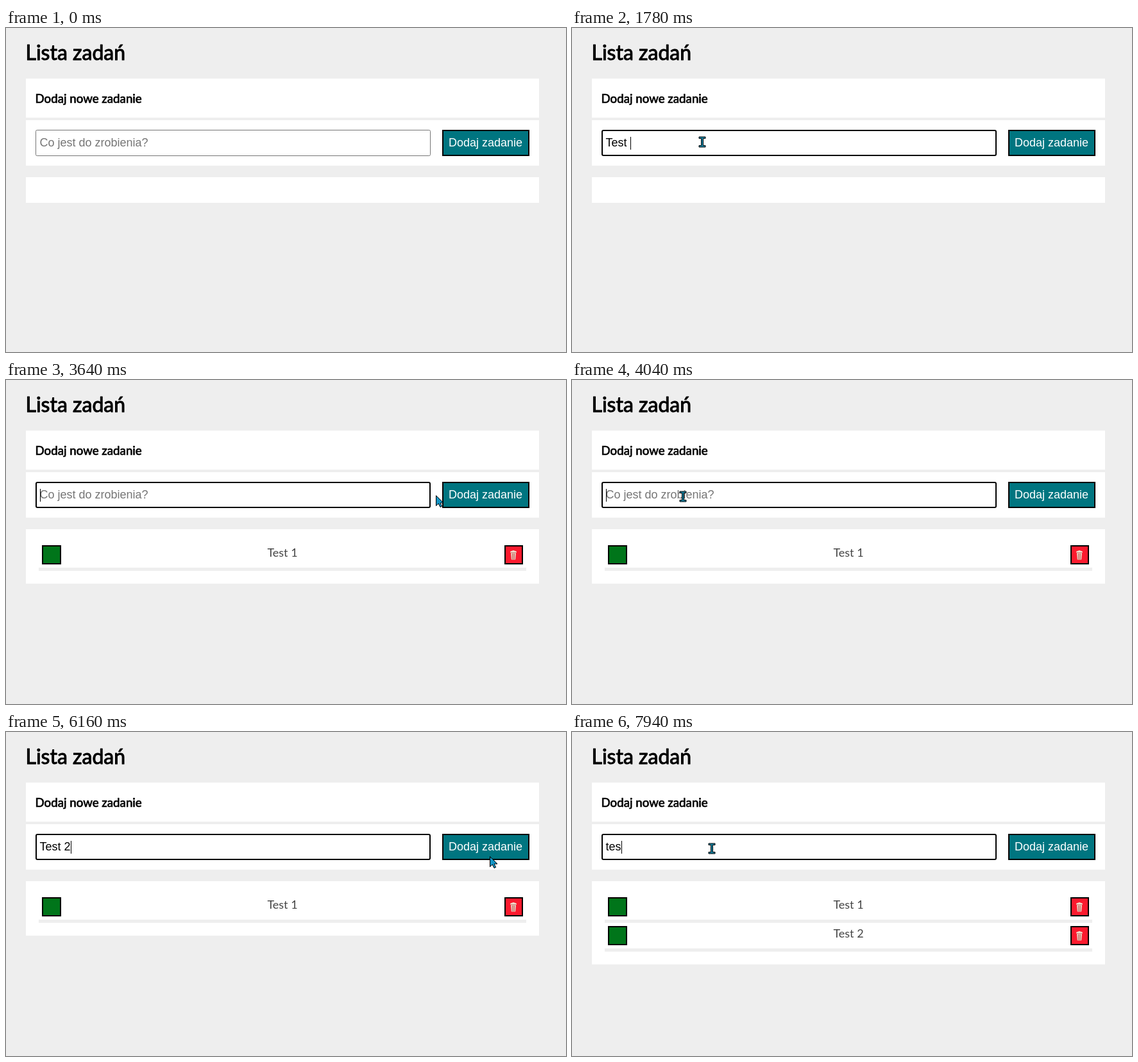
An HTML page for the animation above (8000 ms loop, 873x506 px).

```html
<!DOCTYPE html>
<html lang="pl">
<meta charset="utf-8">
<title>Lista zadań</title>
<style>
  html, body { margin: 0; width: 100%; height: 100%; overflow: hidden; background: #eee; }
  svg { display: block; }
  text { font: 18px "Liberation Sans", Arial, sans-serif; white-space: pre; }
  .lato { font-family: Lato, sans-serif; }
  .heading { stroke: #000; stroke-linejoin: round; }
  .item { fill: #444; text-anchor: middle; }
</style>
<svg width="873" height="506" viewBox="0 0 873 506">
  <defs>
    <g id="row">
      <rect x="51" y="293" width="760" height="5" fill="#eee"/>
      <rect x="57" y="259" width="28" height="28" fill="#00751a" stroke="#000" stroke-width="2"/>
      <rect x="778" y="259" width="27" height="28" fill="#fb1a2e" stroke="#000" stroke-width="2"/>
      <path d="M786 269q0-2 3-2.2q2-1.6 4 0q3 .2 3 2.2l-1 1-.8 10.5h-6.4l-.8-10.5z" fill="#f0ddcc"/>
      <path d="M787 269.8h8M789.3 271v9M791 271v9M792.7 271v9" stroke="#b8453f" stroke-width=".8"/>
    </g>
  </defs>
  <rect width="873" height="506" fill="#eee"/>
  <text class="lato heading" x="30.5" y="50" style="font-size:32px;stroke-width:1">Lista zadań</text>
  <path d="M31 79h800v61h-800zM31 144h800v71h-800z" fill="#fff"/>
  <text class="lato heading" x="45.5" y="117" style="font-size:18.72px;stroke-width:.7">Dodaj nowe zadanie</text>
  <rect id="field" fill="#fff"/>
  <text id="entry" x="52.5" y="185"></text>
  <rect id="caret" y="170" width="1" height="20"/>
  <rect x="681" y="160" width="134" height="39" fill="#007580" stroke="#000" stroke-width="2"/>
  <text x="690" y="185" fill="#fff">Dodaj zadanie</text>
  <rect id="panel" x="31" y="233" width="800" fill="#fff"/>
  <g id="task1"><use href="#row"/><text class="lato item" x="431" y="276">Test 1</text></g>
  <g id="task2"><use href="#row" y="45"/><text class="lato item" x="431" y="321">Test 2</text></g>
  <path id="pointer" stroke="#000"/>
</svg>
<script>
  const LOOP = 8000, ENTER = 70, FOCUS = 720, KEY = 95, TICK = 65;
  const ARROW = "M.5 .5V16.5L4.2 13 7 18.5 9.6 17.3 7 12H12Z";
  const BEAM = "M-5-8h10v2.5h-3.5v11h3.5v2.5h-10v-2.5h3.5v-11h-3.5z";

  // each task: bursts of steady typing, then the click that adds it
  const tasks = [
    { bursts: [[990, "T"], [1380, "est "], [3100, "1"]], added: 3580 },
    { bursts: [[4830, "T"], [5100, "est"], [5620, " 2"]], added: 6490 },
    { bursts: [[7610, "t"], [7840, "es"]], added: Infinity }
  ];

  // pointer glides: each arcs upwards by lift and slows down at its end
  const entry = { x: 723, y: 471 };
  const glides = [
    { from: ENTER, to: 560, x: 202, y: 176, lift: 265 },
    { from: 1700, to: 2370, x: 214, y: 197, lift: 0 },
    { from: 2755, to: 3490, x: 738, y: 187, lift: 59 },
    { from: 3600, to: 4000, x: 173, y: 182, lift: 30 },
    { from: 4220, to: 4300, x: 177, y: 180, lift: 0 },
    { from: 5700, to: 6160, x: 754, y: 194, lift: 16 },
    { from: 6200, to: 6420, x: 745, y: 188, lift: 0 },
    { from: 6580, to: 7100, x: 218, y: 182, lift: 45 }
  ];

  const $ = id => document.getElementById(id);
  const set = (id, attrs) => { for (const k in attrs) $(id).setAttribute(k, attrs[k]); };
  const show = (id, on) => set(id, { visibility: on ? "visible" : "hidden" });
  const bezier = (a, b, c, k) => Math.round(a * (1 - k) ** 2 + 2 * b * k * (1 - k) + c * k * k);

  function pointerAt(t) {
    let pos = entry;
    for (const g of glides) {
      if (t < g.from) break;
      const p = Math.min(1, (t - g.from) / (g.to - g.from)), k = 1 - (1 - p) ** 2;
      pos = {
        x: bezier(pos.x, (pos.x + g.x) / 2, g.x, k),
        y: bezier(pos.y, (pos.y + g.y) / 2 - g.lift, g.y, k)
      };
    }
    return pos;
  }

  const typed = (bursts, t) => bursts.map(([start, text]) =>
    text.slice(0, Math.max(0, Math.floor((t - start) / KEY) + 1))).join("");

  function draw(t) {
    const focused = t >= FOCUS, inset = focused ? 1 : .5;
    set("field", {
      x: 46 + inset, y: 159 + inset, width: 616 - 2 * inset, height: 41 - 2 * inset,
      rx: 2, stroke: focused ? "#000" : "#767676", "stroke-width": 2 * inset
    });

    const done = tasks.filter(task => t >= task.added).length;
    const value = typed(tasks[done].bursts, t), text = $("entry");
    text.textContent = value || "Co jest do zrobienia?";
    set("entry", { fill: value ? "#000" : "#757575" });
    set("caret", { x: Math.round(53 + (value ? text.getComputedTextLength() : 0)) });
    show("caret", focused && !(t >= 2310 && t < 2840));

    set("panel", { height: 40 + 45 * done });
    show("task1", done > 0);
    show("task2", done > 1);

    const { x, y } = pointerAt(Math.floor((t - 50) / TICK) * TICK + 50);
    const overField = x > 46 && x < 662 && y > 159 && y < 200;
    set("pointer", {
      d: overField ? BEAM : ARROW, fill: overField ? "#16809f" : "#1494c4",
      transform: `translate(${x} ${y})`
    });
    show("pointer", t >= ENTER);
  }

  const start = performance.now();
  (function tick() {
    draw((performance.now() - start) % LOOP);
    requestAnimationFrame(tick);
  })();
</script>
</html>
```
